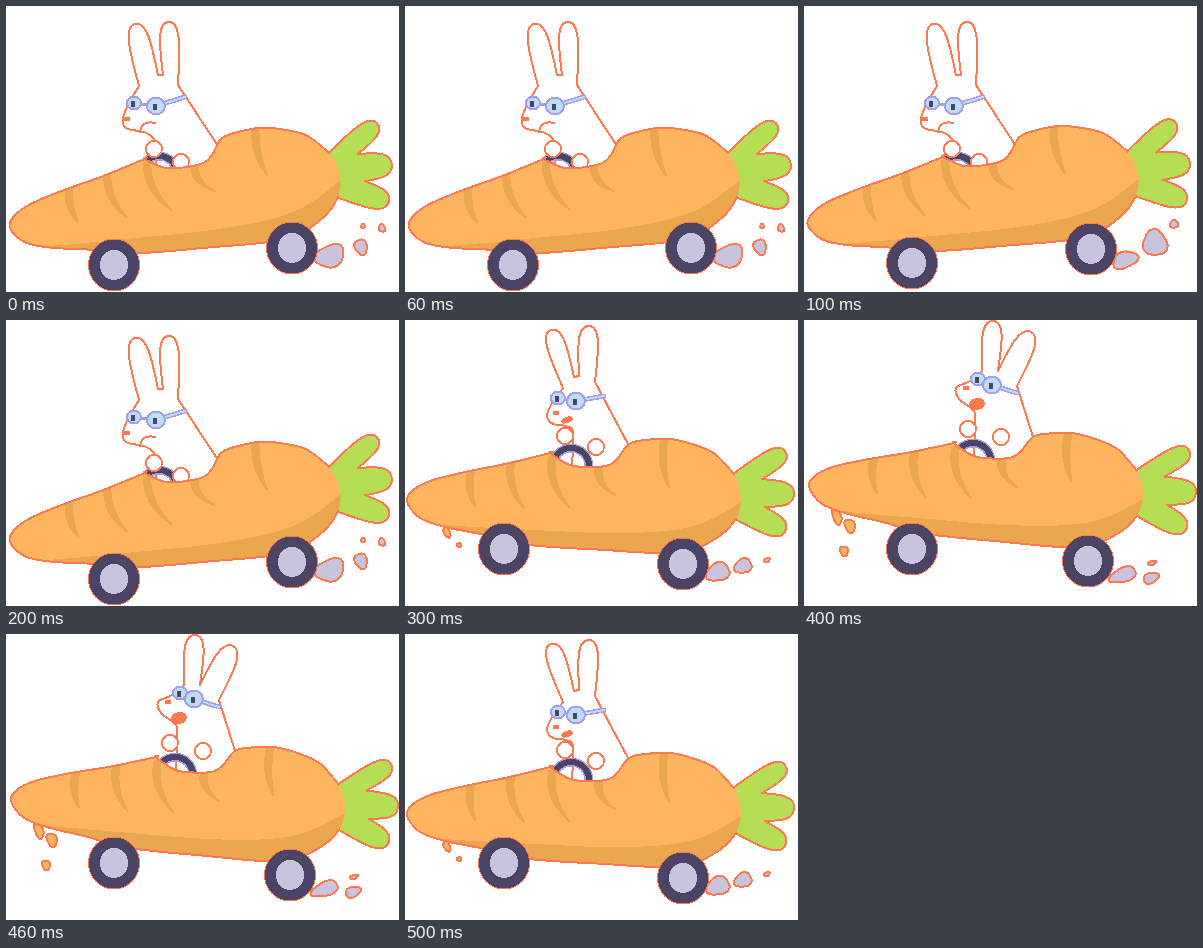
Recreate the animation shown at these times as an HTML page. Size 393 px wide and 286 px high, loop 600 ms.

```html
<!DOCTYPE html>
<html lang="en">
<head>
<meta charset="utf-8">
<title>Rabbit in a carrot car</title>
<style>
html, body { margin: 0; width: 100%; height: 100%; overflow: hidden; background: #fff }
svg { display: block; shape-rendering: crispEdges; stroke-linejoin: round; stroke-linecap: round }
</style>
</head>
<body>
<svg id="stage" width="393" height="286" viewBox="0 0 393 286"></svg>
<script>
const LINE = '#ff784f', CARROT = '#ffb45e', SHADE = '#eba650', LEAF = '#b5de55',
      DARK = '#4c4465', GREY = '#c9c4dd', FRAME = '#a59de8', LENS = '#bcdcfc';

const points = text => text.split(' ').map(s => s.split(',').map(Number));
const mix = (a, b, t = 0.5) => a.map((v, k) => v + (b[k] - v) * t);
const path = (d, fill, stroke = 'none', width = 2) =>
  `<path d="${d}" fill="${fill}" stroke="${stroke}" stroke-width="${width}"/>`;
const oval = (x, y, rx, ry, fill, stroke = 'none', width = 2, tilt = 0) =>
  `<ellipse cx="${x}" cy="${y}" rx="${rx}" ry="${ry}" fill="${fill}" stroke="${stroke}"
    stroke-width="${width}" transform="rotate(${tilt} ${x} ${y})"/>`;

// Smooth open curve through key points; a repeated point makes a sharp corner.
function curve(text) {
  const p = points(text), at = i => p[Math.max(0, Math.min(p.length - 1, i))];
  let d = 'M' + p[0];
  for (let i = 0; i < p.length - 1; i++) {
    const [a, b, c, e] = [at(i - 1), at(i), at(i + 1), at(i + 2)];
    d += `C${b.map((v, k) => v + (c[k] - a[k]) / 6)} ${c.map((v, k) => v - (e[k] - b[k]) / 6)} ${c}`;
  }
  return d;
}

// Rounded finger from base over tip to end: an ear or a leaf.
function lobe(base, tip, end) {
  const root = mix(base, end), dx = tip[0] - root[0], dy = tip[1] - root[1], len = Math.hypot(dx, dy);
  const out = ([x, y], w) => [x - dy / len * w, y + dx / len * w];
  return `L${base}C${out(mix(base, tip), -6)} ${out(tip, -13)} ${tip}` +
    `C${out(tip, 13)} ${out(mix(end, tip), 6)} ${end}`;
}

// Brush stroke bowed to the left, leaning right at its tip.
const stripe = ([x, y, lean, len]) => {
  const bow = y + len * 0.55;
  return path(`M${x - 3} ${y}Q${x - 8} ${bow} ${x + lean} ${y + len}Q${x} ${bow} ${x + 3} ${y}Z`, SHADE, SHADE);
};

// Lumpy drop, tilted along the exhaust stream.
function puff([x, y, rx, ry], fill) {
  const ring = Array.from({ length: 25 }, (_, i) => {
    const a = i * Math.PI / 12, r = 1 + 0.1 * Math.sin(3 * a + x);
    return [rx * r * Math.cos(a), ry * r * Math.sin(a)].map(v => v.toFixed(1));
  });
  return `<g transform="translate(${x} ${y}) rotate(-20)">${path('M' + ring.join('L') + 'Z', fill, LINE)}</g>`;
}

// The carrot is one rigid shape that each pose shifts and rocks.
const hull = curve('331,199 321,211 305,222 282,232 250,233 200,230 125,225 75,214 40,207 15,198 2,182 7,171 25,161 60,152 100,144 145,133 145,133 165,145 187,147 204,145 213,138 224,124 240,120 265,119 290,125 310,134 329,154');
const hullFill = hull + 'Q342 178 331 199Z';
const leaves = 'M328 154' +
  lobe([328, 154], [380, 131], [357, 159]) +
  lobe([357, 159], [389, 174], [360, 187]) +
  lobe([360, 187], [380, 212], [330, 199]);
const stripes = [[66, 150, 4, 36], [106, 142, 13, 46], [147, 137, 17, 50], [194, 147, 16, 28], [259, 120, 5, 47]];
const carrot = path(leaves, LEAF, LINE) + path(hullFill, CARROT) +
  '<g clip-path="url(#hull)">' +
  path(curve('0,198 40,205 130,210 200,213 260,211 300,202 340,180') + 'V290H0Z', SHADE) +
  stripes.map(stripe).join('') + '</g>' + path(hull, 'none', LINE);

const grumpy = {
  face: '150,160 149,136 140,127 120,122 117,112 123,97 133,80',
  ears: '133,80 129,18 152,69 157,69 163,16 172,79', rim: '212,140',
  lenses: [[128, 97], [150, 100]], arm: [179, 91], nose: [121, 113],
  mouth: path('M134 126Q136 114 149 117', 'none', LINE),
  paws: [[148, 143], [175, 156]], wheel: [153, 168]
};
const startled = {
  face: '167,146 168,112 160,106 148,104 142,96 146,85 158,68',
  ears: '158,68 146,10 169,57 174,56 184,6 190,62', rim: '223,124',
  lenses: [[153, 78], [171, 81]], arm: [199, 76], nose: [151, 93],
  mouth: oval(162, 100, 5, 2, LINE, LINE, 2, -20),
  paws: [[160, 116], [191, 127]], wheel: [166, 146]
};
const shouting = {
  face: '170,141 171,105 170,91 156,80 152,68 166,61 178,51',
  ears: '178,51 189,1 194,51 194,51 227,12 213,66', rim: '229,117',
  lenses: [[174, 59], [188, 65]], arm: [213, 73], nose: [162, 68],
  mouth: oval(173, 84, 7, 5, LINE, LINE, 2, -10),
  paws: [[164, 109], [197, 117]], wheel: [169, 141]
};

function drawRabbit(r) {
  const [b1, t1, e1, b2, t2, e2] = points(r.ears), [l1, l2] = r.lenses;
  const arm = `M${l2}L${r.arm}`;
  return path(curve(r.face) + lobe(b1, t1, e1) + lobe(b2, t2, e2) + 'L' + r.rim, '#fff', LINE) +
    oval(...r.wheel, 18, 18, 'none', FRAME, 9) + oval(...r.wheel, 18, 18, 'none', DARK, 6) +
    r.paws.map(p => oval(...p, 8, 8, '#fff', LINE)).join('') +
    r.mouth + oval(...r.nose, 3, 2.5, LINE) +
    path(arm, 'none', FRAME, 5) + path(arm, 'none', LENS, 2) + path(`M${l1}L${l2}`, 'none', FRAME, 3) +
    oval(...l1, 7, 6.5, LENS, FRAME) + oval(...l2, 9, 8.5, LENS, FRAME) +
    r.lenses.map(([x, y]) => oval(x - 1, y + 1, 2.5, 3.5, DARK)).join('');
}

// car: shift x, shift y, tilt; puffs and drips: x, y, radii
const poses = [
  { rabbit: grumpy, car: [0, 16, -8.4], tires: [[108, 259], [286, 242]],
    puffs: [[324, 250, 15, 11], [355, 241, 6, 8], [357, 220, 2, 2], [376, 222, 3, 4]], drips: [] },
  { rabbit: grumpy, car: [0, 14, -8.2], tires: [[108, 257], [287, 243]],
    puffs: [[321, 254, 13, 8], [351, 237, 12, 13], [370, 218, 4, 4]], drips: [] },
  { rabbit: startled, car: [0, 0, 0], tires: [[99, 229], [278, 244]],
    puffs: [[313, 252, 12, 9], [338, 246, 9, 7], [362, 240, 3, 2]], drips: [[42, 212, 3, 6], [54, 225, 2, 2]] },
  { rabbit: shouting, car: [3, -9, 2], tires: [[108, 229], [284, 241]],
    puffs: [[319, 255, 14, 7], [347, 258, 8, 5], [348, 243, 4, 2]], drips: [[33, 197, 4, 8], [46, 206, 5, 7], [40, 231, 4, 5]] }
];

const drawPose = ({ rabbit, car: [x, y, tilt], tires, puffs, drips }) =>
  '<g>' + drawRabbit(rabbit) + drips.map(d => puff(d, CARROT)).join('') +
  `<g transform="translate(${x} ${y}) rotate(${tilt} 170 180)">${carrot}</g>` +
  puffs.map(p => puff(p, GREY)).join('') +
  tires.map(t => oval(...t, 25.5, 26, DARK, LINE, 1) + oval(...t, 14, 15, GREY)).join('') + '</g>';

const stage = document.getElementById('stage');
stage.innerHTML = poses.map(drawPose).join('') +
  `<defs><clipPath id="hull"><path d="${hullFill}"/></clipPath></defs>`;
const groups = [...stage.children], order = [0, 1, 0, 2, 3, 2];

function show(now) {
  const pose = order[Math.floor(now % 600 / 100)];
  poses.forEach((_, i) => groups[i].style.display = i === pose ? '' : 'none');
  requestAnimationFrame(show);
}
show(0);
</script>
</body>
</html>
```
